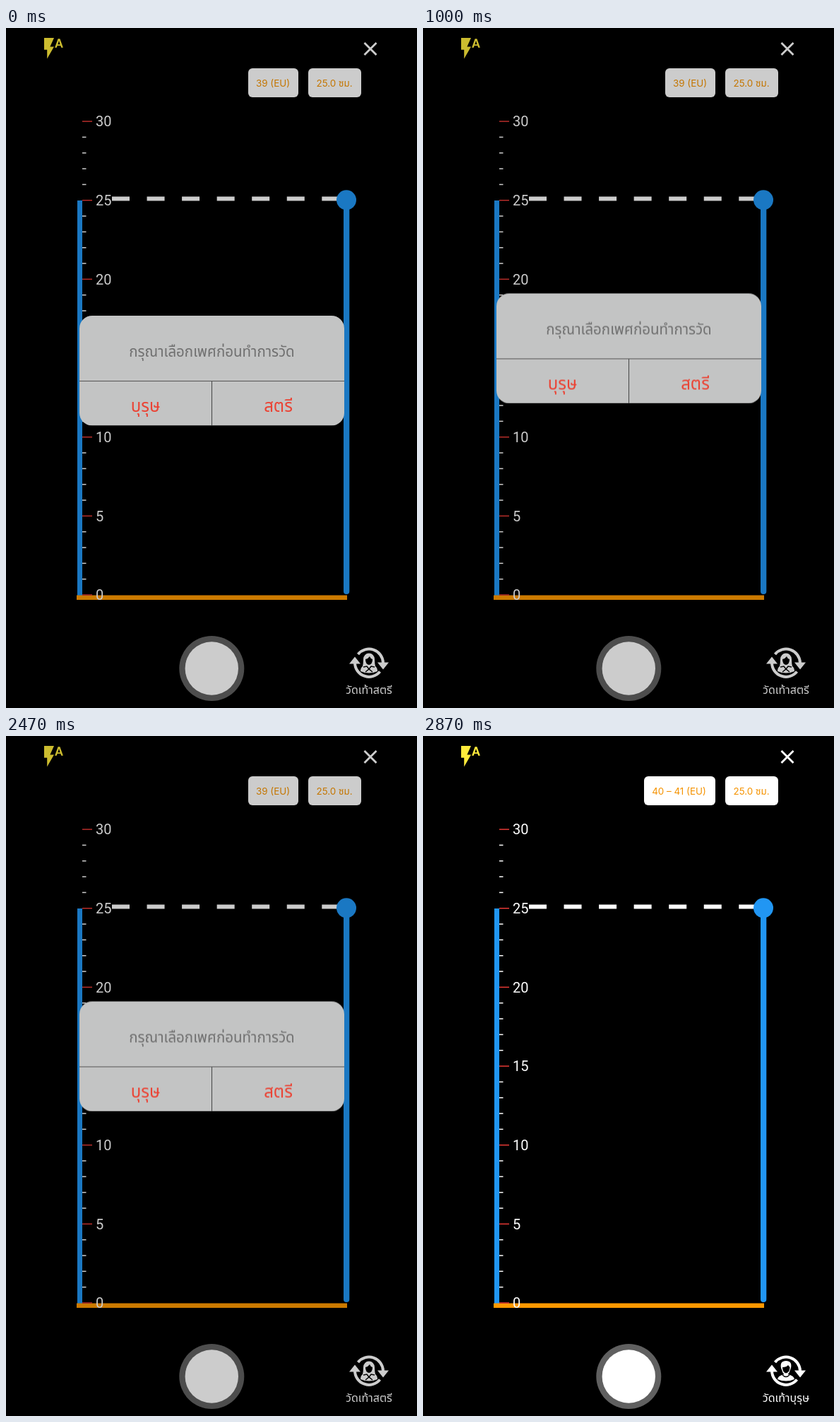
Animation of 582 by 962 pixels, one loop 2.99 s. Source, as an HTML page:

```html
<!DOCTYPE html>
<html lang="th">
<head>
<meta charset="utf-8">
<title>วัดเท้า</title>
<style>
html, body { margin: 0; width: 100%; height: 100%; overflow: hidden; background: #000; }
svg { display: block; width: 100vw; height: 100vh; }
text { font-family: "Noto Sans Thai", "Noto Sans", sans-serif; }
#scale text { font: 20px Roboto, sans-serif; fill: #fff; }
.chip rect { fill: #fff; }
.chip text { font: 13.4px Inter, "Noto Sans Thai", sans-serif; fill: #f59300; }
.mid { text-anchor: middle; }
.label { font-size: 16px; fill: #fff; }
.choice { font-family: "Noto Sans Thai Looped", "Noto Sans Thai", "Noto Sans", sans-serif; font-size: 24px; fill: #eb4334; }
.line { fill: none; stroke: #fff; }
</style>
</head>
<body>
<svg viewBox="0 0 582 962">
  <rect width="582" height="962"/>
  <path fill="#ffeb3b" transform="translate(49.8 11.2) scale(1.4)" d="M3 2v12h3v9l7-12H9l4-9H3zm16 .9h-2l-3.2 9h1.9l.7-2h3.2l.7 2h1.9L19 2.900zm-2.150 5.650L18 4.900l1.150 3.650h-2.300z"/>
  <path class="line" stroke-width="2.8" d="M507.500 21l17 17m0-17l-17 17"/>

  <g class="chip">
    <rect x="428" y="57" width="75" height="41" rx="6"/>
    <text class="mid" x="465" y="83">25.0 ซม.</text>
  </g>
  <g class="chip women">
    <rect x="343" y="57" width="71" height="41" rx="6"/>
    <text class="mid" x="378" y="83">39 (EU)</text>
  </g>
  <g class="chip men">
    <rect x="313" y="57" width="101" height="41" rx="6"/>
    <text class="mid" x="362.500" y="83">40 – 41 (EU)</text>
  </g>

  <rect x="101" y="244" width="7" height="559" fill="#2196f3"/>
  <rect x="100" y="802.500" width="383" height="6.500" fill="#ff9800"/>
  <g id="scale"></g>
  <path id="dash" class="line" stroke-width="5.800" stroke-dasharray="25 24.550" d="M150 241.500H481"/>
  <rect x="478" y="243" width="8.300" height="558" rx="4" fill="#2196f3"/>
  <circle cx="482" cy="243.300" r="14" fill="#2196f3"/>

  <circle cx="291.300" cy="906" r="46" fill="#606060"/>
  <circle cx="291.300" cy="906" r="37.700" fill="#fff"/>

  <path class="line" stroke-width="4" d="M498.500 886A20 20 0 0 1 534 898M494 898A20 20 0 0 0 529.500 910.500"/>
  <path fill="#fff" d="M486 899.500h16l-8-10zM526 897.500h16l-8 10z"/>
  <g class="women">
    <path fill="#fff" d="M505 903q1-4 1-10a8 8.500 0 0 1 16 0q0 6 1 10q3 2 3 7q-12 5-24 0q0-5 3-7z"/>
    <path d="M509 893q4-1 6-4q1 3 4 4q0 7-5 8q-5-1-5-8z"/>
    <path class="line" style="stroke:#000" stroke-width="1.400" d="M506 904l5-1 3 4 3-4 5 1M509 911l5-4 5 4"/>
  </g>
  <g id="man">
    <path fill="#fff" d="M507 894q-2-10 7-10q9 0 7 10l-1.500 4q-1 4-3 5q9 2 9.500 7q-12 5-24 0q.5-5 9.500-7q-2-1-3-5z"/>
    <path d="M509 893q6 0 8-3l2.500 3q0 7-5.500 8.500q-5-1.500-5-8.500z"/>
    <path class="line" style="stroke:#000" stroke-width="1.300" d="M509 904q5 5 10 0"/>
  </g>
  <text class="mid label women" x="514" y="942">วัดเท้าสตรี</text>
  <text class="mid label men" x="514" y="942">วัดเท้าบุรุษ</text>

  <rect id="dim" width="582" height="962"/>
  <g id="dialog">
    <rect x="104" y="375.500" width="375" height="155.500" rx="18" fill="#c3c4c4"/>
    <rect x="104" y="467.500" width="375" height="1" fill="#555"/>
    <rect x="291" y="468.500" width="1" height="62.500" fill="#444"/>
    <text class="mid" x="291.500" y="433" font-size="20.500" fill="#707070">กรุณาเลือกเพศก่อนทำการวัด</text>
    <text class="mid choice" x="197.500" y="511">บุรุษ</text>
    <text class="mid choice" x="385.500" y="511">สตรี</text>
  </g>
</svg>
<script>
const LOOP = 2990, CLOSE = 2530;
const $$ = s => document.querySelectorAll(s);

// Ruler: 0 to 30, long red tick and number every 5
let marks = '';
for (let n = 0; n <= 30; n++) {
  const y = 802 - n * 22.33, major = n % 5 === 0;
  marks += `<rect x="108" y="${y - .75}" width="${major ? 14 : 5.5}" height="1.5" fill="${major ? '#e53935' : '#fff'}"/>`;
  if (major) marks += `<text x="127" y="${y + 7.2}">${n}</text>`;
}
document.getElementById('scale').innerHTML = marks;

// steps: [time, value] pairs, each held until the next
function play(selector, prop, steps) {
  const frames = steps.map(([t, v]) => ({ offset: t / LOOP, [prop]: v, easing: 'step-end' }));
  frames.push({ offset: 1, [prop]: steps[steps.length - 1][1] });
  $$(selector).forEach(el => el.animate(frames, { duration: LOOP, iterations: Infinity }));
}

const blink = [0, 130, 470, 730, 1000, 1330, 1670, 1930, 2270, 2530, 2870];
play('#dash', 'stroke', blink.map((t, i) => [t, i % 2 ? '#2196f3' : '#ffffff']));
play('#dialog', 'transform', [[0, 31.5], [70, 13], [130, 5], [200, 1], [270, 0]]
  .map(([t, y]) => [t, `translate(0px, ${y}px)`]));
play('#dialog, .women', 'opacity', [[0, 1], [CLOSE, 0]]);
play('.men', 'opacity', [[0, 0], [CLOSE, 1]]);
play('#man', 'opacity', [[0, 0], [2600, 1]]);
play('#dim', 'opacity', [[0, .2], [CLOSE, .12], [2600, .06], [2670, .02], [2730, 0]]);
</script>
</body>
</html>
```
